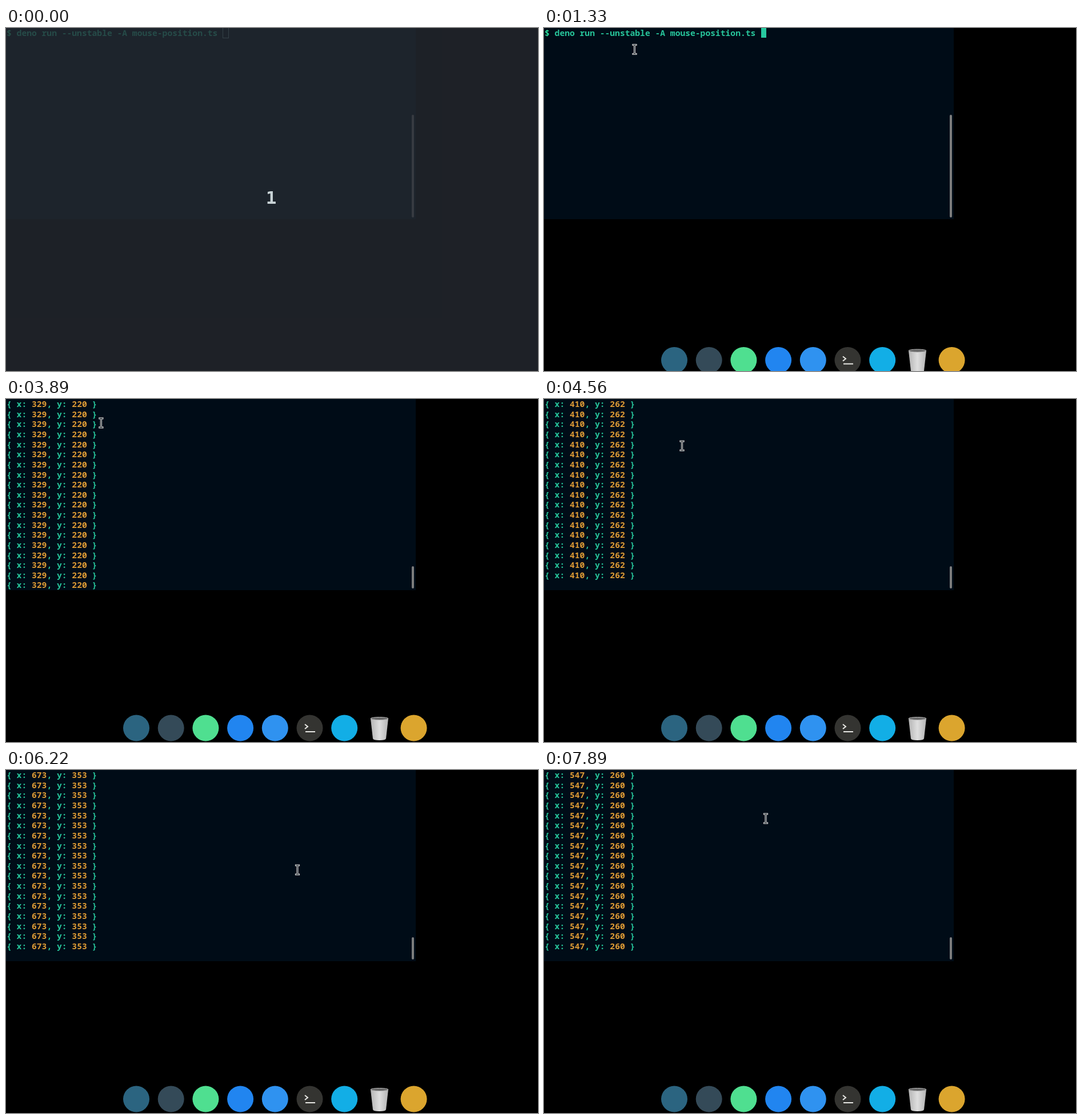
Animation, 931 px wide and 601 px high, one loop 8 s. Source, as an HTML page:

```html
<!DOCTYPE html>
<html lang="en">
<head>
<meta charset="utf-8">
<title>Mouse position</title>
<style>
html, body { margin: 0; width: 100%; height: 100%; overflow: hidden; background: #000; }
body { position: relative; }
body > *, #term > * { position: absolute; }
#term { left: 0; top: 0; width: 717px; height: 335px; background: #000c17; overflow: hidden; }
#out {
  left: 1px; top: .2px; margin: 0; white-space: pre; color: #27c59b;
  font: 700 14.667px/17.63px "Noto Sans Mono", "DejaVu Sans Mono", monospace;
}
#out b { color: #2be3a0; }
#out i { color: #33d978; font-style: normal; }
#out u { color: #dc9a35; text-decoration: none; }
#caret { width: 9.4px; height: 17px; background: #27c99f; }
#caret.hollow { margin: -1px; width: 9px; background: none; border: 1px solid #6f9a9a; }
#bar { left: 710px; width: 4px; bottom: 3px; border-radius: 2px; background: #7d7d7d; }
#scene { left: 0; top: 0; }
#shade { inset: 0; background: rgba(38, 42, 50, .79); }
#count {
  left: 444px; width: 40px; top: 277px; text-align: center; color: #c8d3d6;
  font: 700 31px/40px "DejaVu Sans Mono", monospace;
}
</style>
</head>
<body>
<div id="term">
  <pre id="out"></pre>
  <div id="caret"></div>
  <div id="bar"></div>
</div>
<svg id="scene" width="931" height="601">
  <defs>
    <linearGradient id="tin">
      <stop offset="0" stop-color="#b4b4b4"/>
      <stop offset=".5" stop-color="#dedede"/>
      <stop offset="1" stop-color="#b4b4b4"/>
    </linearGradient>
    <path id="beam" d="M-2.500 -8H2.500M0 -8V8M-2.500 8H2.500"/>
  </defs>
  <g id="dock">
    <g id="discs"></g>
    <path d="M523 570l5 4-5 4M524 583h17" fill="none" stroke="#e8e8e4" stroke-width="2"/>
    <path d="M638 560L642 595Q642.500 598 653.500 598T665 595L669 560Z" fill="url(#tin)"/>
    <ellipse cx="653.500" cy="560" rx="15.500" ry="2.500" fill="#666" stroke="#bdbdbd"/>
  </g>
  <g id="mouse" fill="none" stroke-linecap="square">
    <use href="#beam" stroke="#dcdcdc" stroke-width="3.200"/>
    <use href="#beam" stroke="#20262b" stroke-width="1.200"/>
  </g>
</svg>
<div id="shade"></div>
<div id="count">1</div>
<script>
const LOOP = 8000, ROW = 17.63;
const $ = id => document.getElementById(id);
const [out, caret, bar, dock, mouse, shade, count] =
  ['out', 'caret', 'bar', 'dock', 'mouse', 'shade', 'count'].map($);

const discColors = ['#2b6480', '#344a58', '#4fdf90', '#2185f0', '#2f92f0', '#343431', '#12aee6', null, '#dba52e'];
$('discs').innerHTML = discColors.map((color, i) => color
  ? `<circle cx="${228 + i * 60.7}" cy="576.500" r="23" fill="${color}"/>` : '').join('');

// Pointer stops: time, position, and offset from pointer to reported position.
const stop = (t, x, y, dx = 163, dy = 178) => ({ t, x, y, dx, dy });
const path = [
  stop(560, 262, -20), stop(670, 230, -4), stop(890, 149, 25), stop(1110, 158.5, 37.5),
  stop(3780, 158.5, 37.5), stop(4220, 190, 55), stop(4560, 241.5, 82, 168.5, 180),
  stop(4670, 265, 98), stop(5110, 440, 185), stop(5560, 631.5, 133, 174.5, 174),
  stop(5780, 560, 70), stop(6000, 450, 110), stop(6220, 510, 175), stop(6440, 615, 130),
  stop(6610, 570, 75), stop(6780, 494, 125, 161, 190), stop(7060, 505, 175),
  stop(7330, 574, 125), stop(7610, 480, 100), stop(7890, 388, 85, 159, 175), stop(8000, 365, 70)
];

function pointerAt(t) {
  const n = Math.max(1, path.findIndex(p => p.t >= t));
  const a = path[n - 1], b = path[n];
  const k = Math.max(0, (t - a.t) / (b.t - a.t));
  const mix = key => a[key] + (b[key] - a[key]) * k;
  return { x: mix('x'), y: mix('y'), dx: mix('dx'), dy: mix('dy') };
}

const command = '<b>$</b> deno run --unstable -A mouse-position.ts ';
const compile = '\n<i>Compile</i> file:///mnt/A06A9A196A99EC72/data/Projects/autopilot-deno/examples/mouse\n-position.ts';

function screenText(t, tick, p) {
  if (t < 2330) return command;
  if (t < 2440) return command + '\n';
  if (t < 3440) return command + compile;
  const line = `{ x: <u>${Math.round(p.x + p.dx)}</u>, y: <u>${Math.round(p.y + p.dy)}</u> }\n`;
  return line.repeat(tick % 5 ? 18 : 19);
}

function placeCaret(t) {
  const visible = t < 1560 || (t >= 2110 && t < 3000);
  const row = t < 2330 ? 0 : t < 2440 ? 1 : 3;
  caret.className = t < 1000 ? 'hollow' : '';
  caret.style.display = visible ? '' : 'none';
  caret.style.left = (row ? 1 : 379.6) + 'px';
  caret.style.top = Math.round(row * ROW) + 'px';
}

const tickStart = i => Math.round(i * 100 / 9) * 10;
let shown = -1;

function draw(now) {
  requestAnimationFrame(draw);
  const time = now % LOOP;
  let tick = Math.floor((time + 5) * 9 / 1000);
  if (tickStart(tick) > time) tick--;
  if (tick === shown) return;
  shown = tick;

  const t = tickStart(tick), p = pointerAt(t);
  out.innerHTML = screenText(t, tick, p);
  placeCaret(t);
  bar.style.height = (t < 3440 ? 180 : t < 3560 ? 80 : 39) + 'px';

  shade.style.display = count.style.display = t < 440 ? '' : 'none';
  dock.style.display = t < 1330 ? 'none' : '';
  dock.setAttribute('transform', `translate(0 ${t < 1440 ? 5.5 : t < 1560 ? 1 : 0})`);

  const pointerOn = (t >= 670 && t < 2330) || t >= 3890;
  mouse.style.display = pointerOn ? '' : 'none';
  mouse.setAttribute('transform', `translate(${p.x} ${p.y})`);
}
requestAnimationFrame(draw);
</script>
</body>
</html>
```
